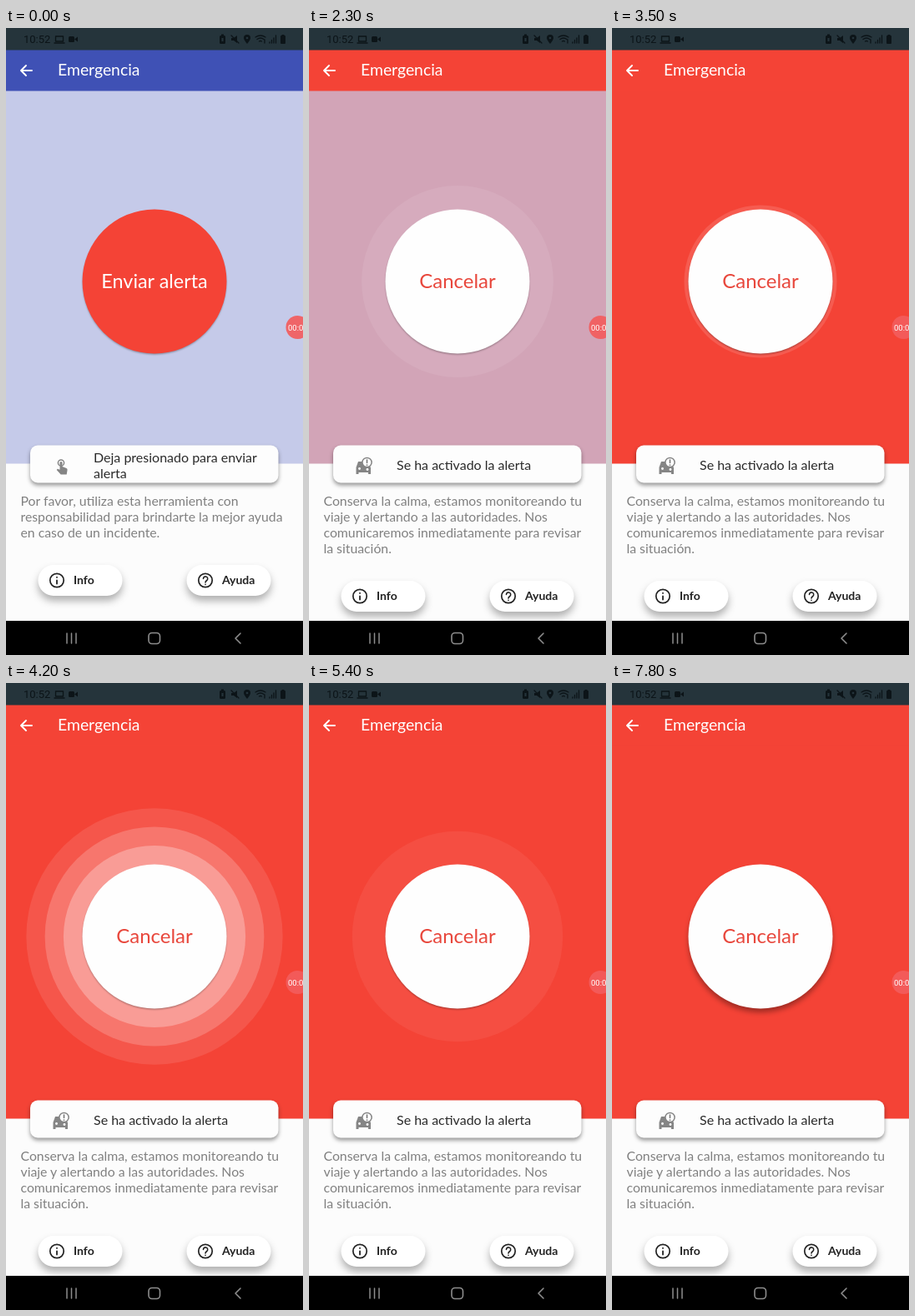
Animation of 356 by 752 pixels, one loop 8 s. Source, as an HTML page:

```html
<!DOCTYPE html>
<html lang="es">
<head>
<meta charset="utf-8">
<title>Emergencia</title>
<style>
  html, body { margin: 0; width: 100%; height: 100%; overflow: hidden; background: #000; }
  svg { display: block; }
  text { font-family: Lato, sans-serif; }
  .body { font-size: 15.8px; fill: #808080; }
  .note { font-size: 16px; fill: #2a2a2a; }
  .btn { font-size: 14px; font-weight: 700; fill: #222; }
  .small { font-family: Roboto, sans-serif; }
  .street { font: 9px Roboto, sans-serif; fill: #707070; text-anchor: middle; stroke: #fff; stroke-width: 1.5px; paint-order: stroke; }
  .line { fill: none; stroke-linecap: round; stroke-linejoin: round; }
  .soft { filter: drop-shadow(0 2px 2px rgba(0,0,0,.35)); }
  .panel { filter: drop-shadow(0 3px 2.5px rgba(0,0,0,.4)); }
  .lift { filter: drop-shadow(0 6px 5px rgba(0,0,0,.3)); }
  .deep { filter: drop-shadow(2px 3px 5px rgba(0,0,0,.75)); }
</style>
</head>
<body>
<svg id="stage" width="356" height="752" viewBox="0 0 356 752"></svg>
<script>
const CX = 178, CY = 304, R = 86.5;

const label = (x, y, text, cls, extra = '') => `<text x="${x}" y="${y}" class="${cls}" ${extra}>${text}</text>`;
const box = (x, y, w, h, r, fill, cls = '') =>
  `<rect x="${x}" y="${y}" width="${w}" height="${h}" rx="${r}" fill="${fill}" class="${cls}"/>`;
const line = (d, color, width) => `<path class="line" d="${d}" stroke="${color}" stroke-width="${width}"/>`;
const lines = (rows, y) => rows.map((s, i) => label(17.5, y + i * 19, s, 'body')).join('');

// ---- map ----
let seed = 7;
const rnd = () => (seed = seed * 16807 % 2147483647) / 2147483647;

function parcels(matrix, clip, id) {
  let d = '', fills = '';
  for (let x = -320; x < 320; x += 48) {
    for (let y = -420; y < 420; y += 37) {
      for (let row = 0; row < 2; row++) {
        let px = 4;
        while (px < 40) {
          const w = Math.min(5 + rnd() * 9, 45 - px), h = 8 + rnd() * 5;
          if (rnd() < .72) {
            const r = `M${(x + px).toFixed(1)} ${y + 4 + row * 15}h${w.toFixed(1)}v${h.toFixed(1)}h${(-w).toFixed(1)}z`;
            if (rnd() < .018) fills += r; else d += r;
          }
          px += w + 1;
        }
      }
    }
  }
  return `<clipPath id="${id}"><path d="${clip}"/></clipPath><g clip-path="url(#${id})">
    <g transform="matrix(${matrix})"><path d="${d}" fill="#f5f5f6" stroke="#e7e7e9" stroke-width=".7"/>
    <path d="${fills}" fill="#fdf3d6"/></g></g>`;
}

const streets = [
  ['C. Luis Bermejo de Tarandela', 101, 31, -1],
  ['Perif. Portal de la Amapola', 311, 79, 52],
  ['Toneles de Marandíbucuro', 226, 189, -9],
  ['Arq. Paisajes', 300, 216, -10],
  ['C. Hilanderas de Solumbre', 259, 264, -9],
  ['C. Marvente', 323, 282, 65],
  ['Calle Arq Ornamentales', 73, 249, -80],
  ['Av. del Campanero', 112, 279, -78],
  ['Arq. Decoradores', 166, 246, -78],
  ['Lumbaro', 128, 341, 0],
  ['And. F', 137, 365, -80],
  ['Bonacurime', 59, 383, 4],
  ['C. Tolvino', 264, 365, -25],
  ['Loma Gris', 280, 397, 65],
  ['Dos Laderas', 315, 378, 68],
  ['Nogalares de Quirambatento', 75, 448, 4],
  ['Sombalero', 299, 467, -20],
  ['Molaneri', 56, 500, 3],
  ['Velunturcan', 215, 517, -78],
  ['Orlamba', 284, 537, -75],
  ['C. de Montavel', 82, 558, 5],
  ['Quelaranda', 92, 608, 3],
  ['Del Molino', 88, 640, 8],
  ['C. Uldia', 321, 610, 68],
  ['C. G', 242, 474, 80],
  ['C. E', 24, 527, -80],
  ['Olmi', 144, 524, -78]
];

const roads = [
  'M162 27L20 711', 'M98 100L47 380', 'M190 110L128 410', 'M0 368L170 388L250 392',
  'M0 440L240 458', 'M0 492L262 508', 'M0 547L160 562L300 572', 'M0 597L300 617',
  'M0 628L180 654', 'M90 202L356 168', 'M170 228L356 195', 'M120 286L356 246',
  'M225 480L180 711', 'M300 470L258 640', 'M160 440L118 711', 'M45 450L0 630',
  'M305 240L356 350', 'M235 376L356 322', 'M255 480L356 444', 'M262 360L356 570',
  'M0 135L200 116L290 92', 'M280 540L356 700', 'M60 27L40 130'
].join('');
const avenue = 'M150 190L192 300L262 500L335 711';
const highway = 'M258 16L368 164';

const car = `<g class="soft">
  <rect x="164.5" y="325" width="25" height="61" rx="9" fill="#f3a21b" stroke="#7a5310"/>
  <path d="M169 329Q177 323 185 329L184 341H170Z" fill="#ffb92e"/>
  <path d="M166.500 344Q177 336 187.500 344L185 353H169Z" fill="#1d2025"/>
  <path d="M168 372H186L187 378Q177 383 167 378Z" fill="#1d2025"/>
  <path d="M165.500 348L169 355V370L165.500 375ZM188.500 348L185 355V370L188.500 375Z" fill="#3b2f18"/>
  ${box(173, 357, 9, 4, 1, '#e8dfc6')}
  ${box(165, 382, 4, 2, 1, '#c43424')}${box(185, 382, 4, 2, 1, '#c43424')}</g>`;

const map = `<g id="map" clip-path="url(#view)">
  ${box(0, 26, 356, 685, 0, '#f9f9fa')}
  ${parcels('.996 .087 -.2 .98 110 400', 'M0 26H190L150 190L192 300L262 500L335 711H0Z', 'west')}
  ${parcels('.988 -.156 -.2 .98 230 200', 'M190 26H250L356 165V250L188 285L150 190Z', 'north')}
  ${parcels('.92 -.39 .42 .91 290 420', 'M188 285L356 250V711H335L262 500Z', 'east')}
  ${line(roads, '#ececee', 7)}${line(avenue, '#e8e8ea', 10)}
  ${line(roads, '#fff', 6)}${line(avenue, '#fff', 9)}
  ${line(highway, '#f0dfa0', 22)}${line(highway, '#feefb9', 20)}${line(highway, '#fff9e2', 3)}
  ${streets.map(([s, x, y, a]) => label(x, y, s, 'street', `transform="rotate(${a} ${x} ${y})"`)).join('')}
  ${car}
  ${box(-12, 51, 83, 29, 10, '#3f51b5', 'deep')}
  ${line('M26 60H46M26 66H46M26 72H46', '#fff', 2.4)}
  ${box(121, 44, 124, 43, 20, '#fff', 'soft')}
  <path d="M183 55L195 76H171Z" fill="#f30d0d"/>${line('M183 63V68M183 72.3V72.5', '#fff', 2)}
  ${box(300, 44, 53, 43, 19, '#263238', 'soft')}
  <circle cx="326" cy="66" r="6.5" fill="none" stroke="#fff" stroke-width="1.7"/>
  ${line('M326 57V60M326 72V75M317 66H320M332 66H335', '#fff', 1.7)}
  <g opacity=".85">${box(312, 630, 33, 66, 2, '#fff')}</g>
  ${line('M322 646H335M328.5 639.5V652.5M322 679H335', '#5c5c5c', 2.4)}${line('M318 663H339', '#e6e6e6', 1)}
  ${box(52, 641, 252, 43, 12, '#263238', 'lift')}
  ${label(178, 668, 'CONECTADO', 'btn', 'text-anchor="middle" style="fill:#fff"')}
  <circle cx="14" cy="695" r="8" fill="#777"/></g>`;

// ---- emergency page ----
const pill = (x, y, text, help) => `<g>${box(x, y, 101, 37, 18.5, '#fff', 'lift')}
  <circle cx="${x + 22.5}" cy="${y + 18.5}" r="8.2" fill="none" stroke="#222" stroke-width="1.7"/>
  ${help
    ? line(`M${x + 20} ${y + 16.5}a2.6 2.6 0 1 1 4.2 2q-1.7 1.2 -1.7 2.4M${x + 22.5} ${y + 23.2}v.2`, '#222', 1.6)
    : line(`M${x + 22.5} ${y + 18.5}v4M${x + 22.5} ${y + 14.7}v.2`, '#222', 1.8)}
  ${label(x + 42.5, y + 23.3, text, 'btn')}</g>`;
const pills = y => pill(38.5, y, 'Info') + pill(216.5, y, 'Ayuda', true);

const tapIcon = `<g fill="#858585"><circle cx="66" cy="521.5" r="3.6" fill="none" stroke="#858585" stroke-width="1.5"/>
  <path d="M64.5 521q1.5 -2 3 0v5l5 2q1.5 .8 1 2.5l-.8 5h-7l-5 -5.5l1 -1.2l2.8 1z"/></g>`;
const carIcon = `<g fill="#858585"><path d="M56.5 527l2.5 -7h7q1 4 6 5l2 2v8h-3v-2H59.5v2h-3z"/>
  <circle cx="69.5" cy="521" r="5.6" fill="#fff" stroke="#858585" stroke-width="1.5"/>
  <circle cx="60.5" cy="528.5" r="1.4" fill="#fff"/><circle cx="70" cy="529.5" r="1.4" fill="#fff"/>
  ${line('M69.5 518v3.4M69.5 524v.2', '#777', 1.6)}</g>`;

const page = `<g id="page">
  ${box(0, 26, 356, 685, 0, '#fcfcfc')}
  <rect id="field" y="75" width="356" height="447.5"/>
  <g id="rings">${`<circle cx="${CX}" cy="${CY}" fill="#fff"/>`.repeat(4)}</g>
  <rect id="bar" y="26" width="356" height="49.5"/>
  ${line('M31 51H18.5M24 45L18 51L24 57', '#fff', 1.9)}
  ${label(62, 56.5, 'Emergencia', '', 'font-size="19.4" fill="#fff"')}
  <circle id="shade" cx="${CX}" r="86"/>
  <circle id="disc" cx="${CX}" cy="${CY}" r="${R}"/>
  <circle id="splash" cx="${CX}" cy="${CY}" fill="#fff"/>
  <text id="action" x="${CX}" y="311.5" text-anchor="middle"></text>
  ${box(29, 500.5, 297.5, 45, 9, '#fdfdfd', 'panel')}
  <g id="idle">${tapIcon}${label(105, 521, 'Deja presionado para enviar', 'note')}${label(105, 540, 'alerta', 'note')}
    ${lines(['Por favor, utiliza esta herramienta con', 'responsabilidad para brindarte la mejor ayuda', 'en caso de un incidente.'], 573)}
    ${pills(644)}</g>
  <g id="sent">${carIcon}${label(105, 530, 'Se ha activado la alerta', 'note')}
    ${lines(['Conserva la calma, estamos monitoreando tu', 'viaje y alertando a las autoridades. Nos', 'comunicaremos inmediatamente para revisar', 'la situación.'], 573)}
    ${pills(663)}</g></g>`;

// ---- system bars ----
const ink = '#0c1418', barColor = '#25343b';
const chrome = `${box(0, 0, 356, 26.5, 0, barColor)}
  ${label(21, 18, '10:52', 'small', `font-size="13" fill="${ink}"`)}
  ${line('M59.5 10H68.5V16H59.5ZM58 18H70', ink, 1.3)}
  ${box(75, 10, 7, 7, 1.5, ink)}<path d="M82 13.5L86 10.5V16.5Z" fill="${ink}"/>
  ${box(256, 9, 7, 10, 1.5, ink)}${box(258, 7.5, 3, 2, 0, ink)}${box(258.5, 12, 2, 4, 0, barColor)}
  <path d="M270 12h3l4 -3v9l-4 -3h-3z" fill="${ink}"/>${line('M270 9L279 18', ink, 1.3)}
  <path d="M289 19q-4 -5 -4 -7a4 4 0 0 1 8 0q0 2 -4 7z" fill="${ink}"/><circle cx="289" cy="12" r="1.3" fill="${barColor}"/>
  ${line('M299 11q6 -4 12 0M301 13.5q4 -3 8 0M303.5 16q1.5 -1 3 0M310 14V18', ink, 1.3)}
  ${line('M316 17V18M318.5 14.5V18M321 12V18M323.5 9V18', ink, 1.3)}
  ${box(329, 9, 6, 10, 1, ink)}${box(330.5, 8, 3, 2, 0, ink)}
  ${box(0, 711, 356, 41, 0, '#000')}
  ${line('M73 726V738M78.5 726V738M84 726V738', '#8d8d8d', 1.5)}
  <rect x="171" y="725.5" width="13.5" height="13" rx="4" fill="none" stroke="#8d8d8d" stroke-width="1.6"/>
  ${line('M281 726L275 732L281 738', '#8d8d8d', 1.6)}
  <circle cx="349.5" cy="359" r="14" fill="#f25c5c" opacity=".92"/>
  ${label(338, 362.5, '00:0', 'small', 'font-size="9.5" fill="#fff"')}`;

const $ = id => document.getElementById(id);
$('stage').innerHTML = `<clipPath id="view"><path d="M0 26H356V711H0Z"/></clipPath>
  ${map}<g clip-path="url(#view)">${page}</g>${chrome}`;

// ---- motion ----
const RED = [244, 67, 54], LILAC = [197, 202, 233];
const waves = [[2178, 930], [3480, 1740], [5222, 1740]]; // start, length
const ringSpec = [[0, .14], [190, .1], [300, .19], [410, .28]]; // delay, alpha
const rings = [...$('rings').children];
const clamp = v => Math.max(0, Math.min(1, v));
const ramp = (t, a, b) => clamp((t - a) / (b - a));
const set = (id, props) => Object.entries(props).forEach(([k, v]) => $(id).setAttribute(k, v));
const show = (id, on) => $(id).setAttribute('display', on ? 'inline' : 'none');

function drawRings(t) {
  const wave = t < 6800 && waves.findLast(([start]) => t >= start);
  rings.forEach((el, i) => {
    const age = wave ? t - wave[0] : -1, [delay, alpha] = ringSpec[i];
    const x = ramp(age, delay, 700), grow = 1 - (1 - x) ** 2;
    const fade = wave ? 1 - ramp(age, 750, wave[1]) : 0;
    // the leading ring thins out as it spreads
    el.setAttribute('r', R + (89.5 - 22.3 * i) * grow);
    el.setAttribute('opacity', age < delay ? 0 : alpha * fade * (i ? 1 : (1 - x) ** 3));
  });
}

function draw(t) {
  const sent = t >= 1900;
  const k = ramp(t, 2030, 3000);
  const press = t < 3000 ? ramp(t, 500, 900) * (1 - ramp(t, 1500, 1700)) : ramp(t, 7400, 7800);
  const leave = t < 6800 ? ramp(t, 5650, 5900) : 0;

  set('field', { fill: `rgb(${LILAC.map((c, i) => Math.round(c + (RED[i] - c) * k))})` });
  set('bar', { fill: sent ? '#f44336' : '#3f51b5' });
  set('disc', { fill: sent ? '#fefefe' : '#f44336' });
  set('shade', { cy: CY + 1.5 + 3.5 * press, opacity: .35, style: `filter:blur(${1.3 + 2 * press}px)` });
  set('splash', {
    r: R * ramp(t, 500, 1200),
    opacity: sent ? 0 : .08 * ramp(t, 500, 700) * (1 - ramp(t, 1300, 1700))
  });
  set('action', { fill: sent ? '#e8473c' : '#fff', 'font-size': sent ? 24 : 23.4 });
  $('action').textContent = sent ? 'Cancelar' : 'Enviar alerta';
  show('idle', !sent);
  show('sent', sent);
  drawRings(t);

  show('map', leave > 0);
  show('page', leave < 1);
  set('page', { opacity: 1 - leave, transform: `translate(0 ${60 * leave * leave})` });
}

const origin = performance.now();
function tick() {
  draw(Math.floor((performance.now() - origin) % 8000 / 100) * 100);
  requestAnimationFrame(tick);
}
tick();
</script>
</body>
</html>
```
